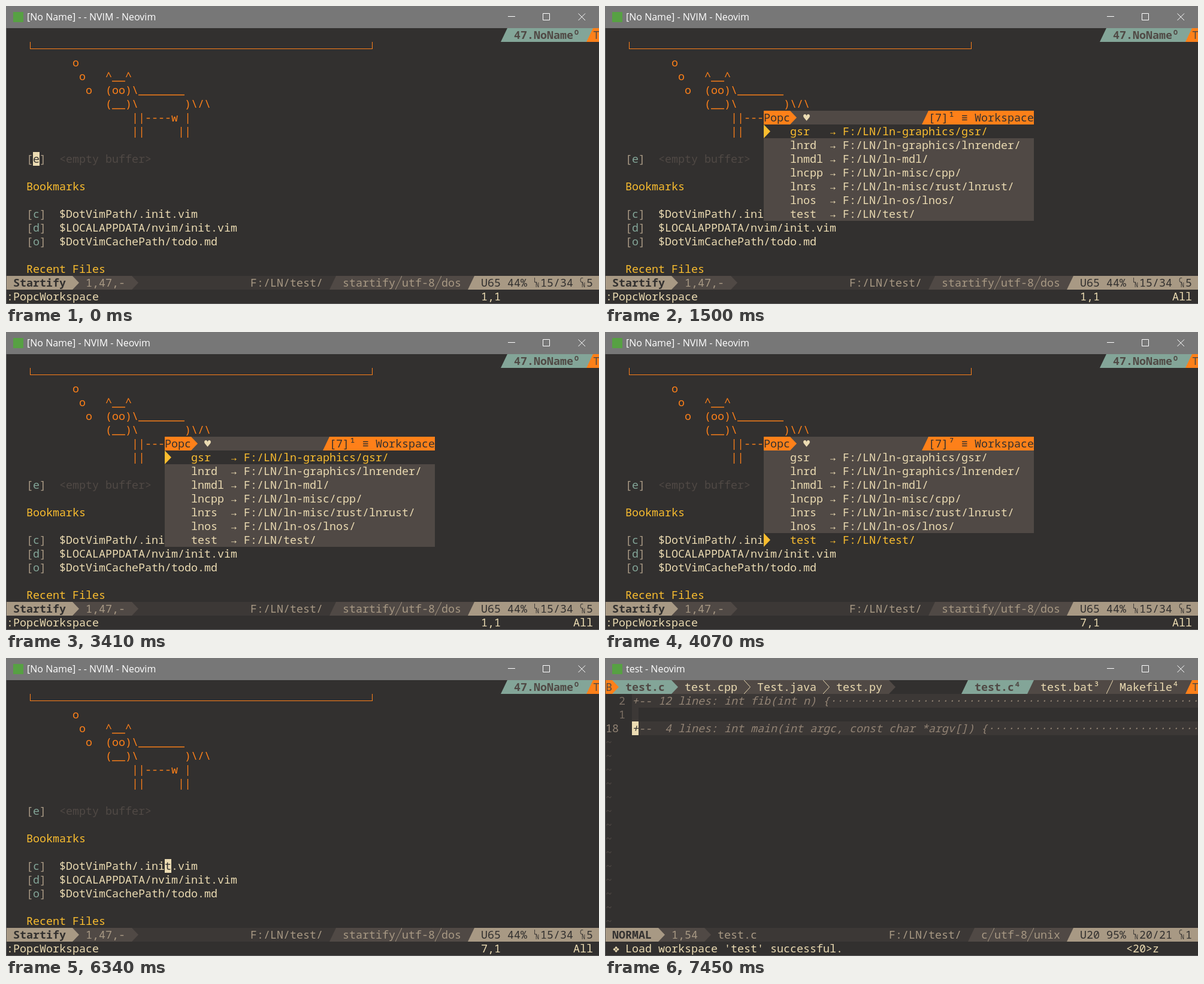
Recreate the animation shown at these times as an HTML page. Size 990 px wide and 498 px high, loop 7480 ms.

```html
<!DOCTYPE html>
<html lang="en">
<head>
<meta charset="utf-8">
<title>Editor workspace popup</title>
<style>
  :root {
    --bg: #32302f; --bg1: #3c3836; --bg2: #504945; --fg: #ebdbb2; --dim: #a89984;
    --gray: #928374; --num: #7c6f64; --orange: #fe8019; --rust: #d65d0e;
    --yellow: #fabd2f; --teal: #83a598;
  }
  html, body { margin: 0; width: 100%; height: 100%; overflow: hidden; background: var(--bg); }
  #stage { position: absolute; left: 0; top: 0; width: 990px; height: 498px; overflow: hidden; }
  #bar { position: absolute; left: 0; top: 0; width: 990px; height: 37px; background: #777; }
  #icon { position: absolute; left: 12px; top: 10px; width: 17px; height: 17px; background: #57a143; }
  #title { position: absolute; left: 35px; top: 7px; color: #fff; white-space: pre;
    font: 16px/23px "Open Sans", "Noto Sans", sans-serif; }
  #bar svg { position: absolute; left: 830px; top: 8px; }
  #term { position: absolute; left: 1px; top: 37px; width: 989px; height: 460px; overflow: hidden;
    background: var(--bg); color: var(--fg);
    font: 18.333px/23px "Noto Sans Mono", "DejaVu Sans Mono", monospace;
    font-variant-ligatures: none; }
  #edge { position: absolute; inset: 37px 0 0 0; border: solid #5f5f5f; border-width: 0 0 1px 1px; }
  #term div, #term span, #term svg { position: absolute; }
  #term span { white-space: pre; margin-top: -1px; }
  .bold { font-weight: bold; }
  .slant { font-style: italic; }
  .tiny { font-size: 10px; line-height: 10px; }
  .right { clip-path: polygon(0 0, 100% 50%, 0 100%); }
  .slope { clip-path: polygon(0 100%, 100% 0, 100% 100%); }
  .line { width: 100%; height: 23px; left: 0; }
  .sel { background: var(--bg); color: var(--yellow); }
</style>
</head>
<body>
<div id="stage">
  <div id="bar">
    <div id="icon"></div>
    <div id="title"></div>
    <svg width="150" height="20" fill="none" stroke="#fff">
      <path d="M8 9.5H20M66.5 4.5h11v11h-11zM125.500 4.500l11.500 11.500M137 4.500l-11.500 11.500"/>
    </svg>
  </div>
  <div id="edge"></div>
  <div id="term"></div>
</div>
<script>
const CW = 11, RH = 23, LOOP = 7480;
const term = document.getElementById('term');
const titleEl = document.getElementById('title');
const color = name => `var(--${name})`;

function add(parent, tag, row, col) {
  const el = document.createElement(tag);
  el.style.left = col * CW + 'px';
  el.style.top = row * RH + 'px';
  parent.append(el);
  return el;
}
function text(parent, row, col, str, ink, cls = '') {
  const el = add(parent, 'span', row, col);
  el.textContent = str;
  el.className = cls;
  if (ink) el.style.color = color(ink);
  return el;
}
function box(parent, row, col, cols, fill, cls = '', rows = 1) {
  const el = add(parent, 'div', row, col);
  el.style.width = cols * CW + 'px';
  el.style.height = rows * RH + 'px';
  if (fill) el.style.background = color(fill);
  el.className = cls;
  return el;
}
const arrow = (parent, row, col, fill) => box(parent, row, col, 1, fill, 'right');
const slope = (parent, row, col, fill) => box(parent, row, col, 1, fill, 'slope');
function stroke(parent, row, col, points, ink) {
  const el = add(parent, 'div', row, col);
  el.innerHTML = `<svg width="11" height="23" fill="none" style="stroke:${color(ink)}"><polyline points="${points}"/></svg>`;
}
const slash = (parent, row, col, ink) => stroke(parent, row, col, '0,23 11,0', ink);
const chevron = (parent, row, col, ink) => stroke(parent, row, col, '0,0 10.5,11.5 0,23', ink);

// Two small letters stacked in one cell
function label(parent, col, top, low) {
  const a = text(parent, 18, col, top, 'bg', 'tiny');
  const b = text(parent, 18, col, low, 'bg', 'tiny');
  a.style.marginTop = '2px';
  b.style.marginTop = '10px';
  b.style.marginLeft = '3px';
}

function statusLine(parent, s) {
  const row = 18, modeEnd = s.mode.length + 2, posEnd = modeEnd + s.pos.length + 3;
  box(parent, row, 0, 90, 'bg1');
  box(parent, row, 0, modeEnd, 'dim');
  box(parent, row, modeEnd, posEnd - modeEnd, 'bg2');
  arrow(parent, row, modeEnd, 'dim');
  arrow(parent, row, posEnd, 'bg2');
  text(parent, row, 1, s.mode, 'bg', 'bold');
  text(parent, row, modeEnd + 2, s.pos, 'dim');
  text(parent, row, posEnd + 2, s.file, 'dim');

  let col = 70 - s.info.join('/').length - 1;
  text(parent, row, col - 14, 'F:/LN/test/', 'dim');
  slope(parent, row, col - 2, 'bg2');
  box(parent, row, col - 1, 71 - col, 'bg2');
  box(parent, row, 70, 1, 'bg2');
  s.info.forEach((word, i) => {
    if (i) slash(parent, row, col++, 'dim');
    text(parent, row, col, word, 'dim');
    col += word.length;
  });
  slope(parent, row, 70, 'dim');
  box(parent, row, 71, 19, 'dim');
  text(parent, row, 72, s.percent, 'bg');
  label(parent, 80, 'L', 'N');
  text(parent, row, 81, s.lines, 'bg');
  label(parent, 87, 'C', 'N');
  text(parent, row, 88, s.column, 'bg');
}

function tabCorner(parent) {
  slope(parent, 0, 88, 'orange');
  box(parent, 0, 89, 1, 'orange');
  text(parent, 0, 89, 'T', 'bg2');
}

function startView() {
  const v = box(term, 0, 0, 90, '', '', 20);
  slope(v, 0, 75, 'teal');
  box(v, 0, 76, 13, 'teal');
  text(v, 0, 77, '47.NoName⁰', 'bg2', 'bold');
  tabCorner(v);

  const rule = add(v, 'div', 1, 3.5);
  rule.style.cssText += 'width:570px;height:11px;border:solid var(--orange);border-width:0 1px 1px 1px';
  const cow = [[2, 10, 'o'], [3, 11, 'o   ^__^'], [4, 12, 'o  (oo)\\_______'],
    [5, 15, '(__)\\       )\\/\\'], [6, 19, '||----w |'], [7, 19, '||     ||']];
  cow.forEach(([row, col, str]) => text(v, row, col, str, 'orange'));

  const entries = [[9, 'e', '<empty buffer>'], [13, 'c', '$DotVimPath/.init.vim'],
    [14, 'd', '$LOCALAPPDATA/nvim/init.vim'], [15, 'o', '$DotVimCachePath/todo.md']];
  entries.forEach(([row, key, str]) => {
    text(v, row, 3, '[ ]', 'dim');
    text(v, row, 4, key, 'teal');
    text(v, row, 8, str, row === 9 ? 'bg2' : 'fg');
  });
  text(v, 11, 3, 'Bookmarks', 'yellow');
  text(v, 17, 3, 'Recent Files', 'yellow');
  statusLine(v, { mode: 'Startify', pos: '1,47,-', file: '', info: ['startify', 'utf-8', 'dos'],
    percent: 'U65 44%', lines: '15/34', column: '5' });
  text(v, 19, 0, ':PopcWorkspace');
  return v;
}

function codeView() {
  const v = box(term, 0, 0, 90, '', '', 20);
  box(v, 0, 0, 1, 'orange');
  box(v, 0, 1, 9, 'teal');
  arrow(v, 0, 1, 'orange');
  box(v, 0, 10, 33, 'bg2');
  arrow(v, 0, 10, 'teal');
  arrow(v, 0, 43, 'bg2');
  text(v, 0, 0, 'B', 'bg2');
  text(v, 0, 3, 'test.c', 'bg2', 'bold');
  [[12, 'test.cpp'], [23, 'Test.java'], [35, 'test.py']].forEach(([col, str]) => text(v, 0, col, str));
  chevron(v, 0, 21, 'fg');
  chevron(v, 0, 33, 'fg');

  slope(v, 0, 54, 'teal');
  box(v, 0, 55, 10, 'teal');
  slope(v, 0, 64, 'bg2');
  box(v, 0, 65, 24, 'bg2');
  text(v, 0, 56, 'test.c⁴', 'bg2', 'bold');
  text(v, 0, 66, 'test.bat³');
  slash(v, 0, 76, 'fg');
  text(v, 0, 78, 'Makefile⁴');
  tabCorner(v);

  const folds = [[1, '+-- 12 lines: int fib(int n) {'],
    [3, '+--  4 lines: int main(int argc, const char *argv[]) {']];
  folds.forEach(([row, str]) => {
    box(v, row, 4, 86, 'bg1');
    text(v, row, 4, str.padEnd(86, '·'), 'gray', 'slant');
  });
  box(v, 2, 4, 1, 'bg1');
  text(v, 1, 2, '2', 'num');
  text(v, 2, 2, '1', 'num');
  text(v, 3, 0, '18', 'gray');
  for (let row = 4; row < 18; row++) text(v, row, 0, '~', 'bg2');
  statusLine(v, { mode: 'NORMAL', pos: '1,54', file: 'test.c', info: ['c', 'utf-8', 'unix'],
    percent: 'U20 95%', lines: '20/21', column: '1' });
  text(v, 19, 1.1, '❖');
  text(v, 19, 3, "Load workspace 'test' successful.");
  return v;
}

function popup(row, col, cols, rows, count, gap) {
  const p = box(term, row, col, cols, 'bg2', '', rows + 1);
  const tail = cols - 9 - 2 - gap - count.length - 1;
  box(p, 0, 0, 4, 'orange');
  arrow(p, 0, 4, 'orange');
  text(p, 0, 0, 'Popc', 'bg');
  text(p, 0, 6, '♥');
  slope(p, 0, tail - 1, 'orange');
  box(p, 0, tail, cols - tail, 'orange');
  text(p, 0, tail, count, 'bg');
  p.index = text(p, 0, tail + count.length, '¹', 'bg');
  text(p, 0, cols - 11, '≡', 'bg');
  text(p, 0, cols - 9, 'Workspace', 'bg');
  p.lines = Array.from({ length: rows }, (_, i) => add(p, 'div', i + 1, 0));
  p.mark = arrow(p, 1, 0, 'yellow');
  p.select = n => {
    p.lines.forEach((line, i) => line.className = i === n ? 'line sel' : 'line');
    p.mark.style.top = (n + 1) * RH + 'px';
    p.index.textContent = '¹²³⁴⁵⁶⁷'[n];
  };
  p.select(0);
  return p;
}

function listPopup() {
  const spaces = [['gsr', 'ln-graphics/gsr/'], ['lnrd', 'ln-graphics/lnrender/'], ['lnmdl', 'ln-mdl/'],
    ['lncpp', 'ln-misc/cpp/'], ['lnrs', 'ln-misc/rust/lnrust/'], ['lnos', 'ln-os/lnos/'], ['test', 'test/']];
  const p = popup(6, 24, 41, spaces.length, '[7]', 1);
  spaces.forEach(([name, path], i) => {
    text(p.lines[i], 0, 4, name);
    text(p.lines[i], 0, 10, '→');
    text(p.lines[i], 0, 12, 'F:/LN/' + path);
  });
  return p;
}

function helpPopup() {
  const keys = [['w', 'Pop workspace layer'],
    ['CR,Space,t,T', 'Load workspace (CR-Open, Space-Stay, tT-Tab)'], ['a', 'Add new workspace'],
    ['s,S', 'Save the workspace (S-Save in force)'], ['d', 'Delete the workspace'],
    ['C', 'Close current workspace'], ['n', 'Set name of workspace'], ['r', 'Set root of workspace'],
    ['g', 'Display sorted workspaces'], ['k,C-k', 'Operation up'], ['j,C-j', 'Operation down'],
    ['M-k', 'Operation page up'], ['M-j', 'Operation page down']];
  const p = popup(3, 13, 63, keys.length + 1, '[19]', 2);
  text(p.lines[0], 0, 2, '~~~~~ Popc 3.7.23 (In layer Workspace) ~~~~~');
  keys.forEach(([key, info], i) => {
    const line = p.lines[i + 1];
    text(line, 0, 2, key);
    text(line, 0, 15, '|');
    text(line, 0, 17, info.replace(/[(),]/g, ' '));
    text(line, 0, 17, info.replace(/[^(),]/g, ' '), 'rust');
  });
  return p;
}

const views = { start: startView(), code: codeView() };
const pops = { list: listPopup(), help: helpPopup() };
const pos = text(term, 19, 72, '');
const part = text(term, 19, 86, '');
const keys = text(term, 19, 79, '');
const cursor = box(term, 0, 0, 1, 'fg');
const under = text(cursor, 0, 0, '', 'bg');

const idle = '[No Name] - - NVIM - Neovim', busy = '[No Name] - NVIM - Neovim';
const steps = [
  [0, { view: 'start', pop: '', title: idle, at: [9, 4, 'e'], on: 1, keys: '', pos: '1,1', part: '', sel: 0 }],
  [80, { on: 0 }], [490, { on: 1 }], [740, { on: 0 }],
  [990, { keys: '<20>' }],
  [1170, { on: 1, keys: '<20><20>' }],
  [1420, { on: 0, keys: '', pop: 'list', part: 'All' }],
  [1500, { title: busy }],
  [2490, { pop: 'help', part: 'Top' }],
  [3410, { pop: 'list', part: 'All' }],
  [4070, { sel: 6, pos: '7,1' }],
  [4610, { pop: '', title: idle, at: [13, 24, 't'], on: 1 }],
  [5300, { on: 0 }], [5680, { on: 1 }], [5930, { on: 0 }], [6340, { on: 1 }],
  [6370, { view: 'code', title: 'test - Neovim', at: [3, 4, '+'], pos: '', part: '' }],
  [7030, { on: 0 }],
  [7240, { keys: '<20>' }],
  [7420, { on: 1 }],
  [7450, { keys: '<20>z' }]
];

const show = (group, name) => {
  for (const k in group) group[k].style.display = k === name ? '' : 'none';
};
function draw(s) {
  show(views, s.view);
  show(pops, s.pop);
  pops.list.select(s.sel);
  titleEl.textContent = s.title;
  pos.textContent = s.pos;
  part.textContent = s.part;
  keys.textContent = s.keys;
  const [row, col, char] = s.at;
  cursor.style.left = col * CW + 'px';
  cursor.style.top = row * RH + 'px';
  cursor.style.display = s.on ? '' : 'none';
  under.textContent = char;
  under.className = s.view === 'code' ? 'slant' : '';
}

let shown = 0;
function tick() {
  const t = performance.now() % LOOP;
  const past = steps.filter(([time]) => time <= t);
  if (past.length !== shown) {
    shown = past.length;
    draw(Object.assign({}, ...past.map(([, change]) => change)));
  }
  requestAnimationFrame(tick);
}
tick();
</script>
</body>
</html>
```
